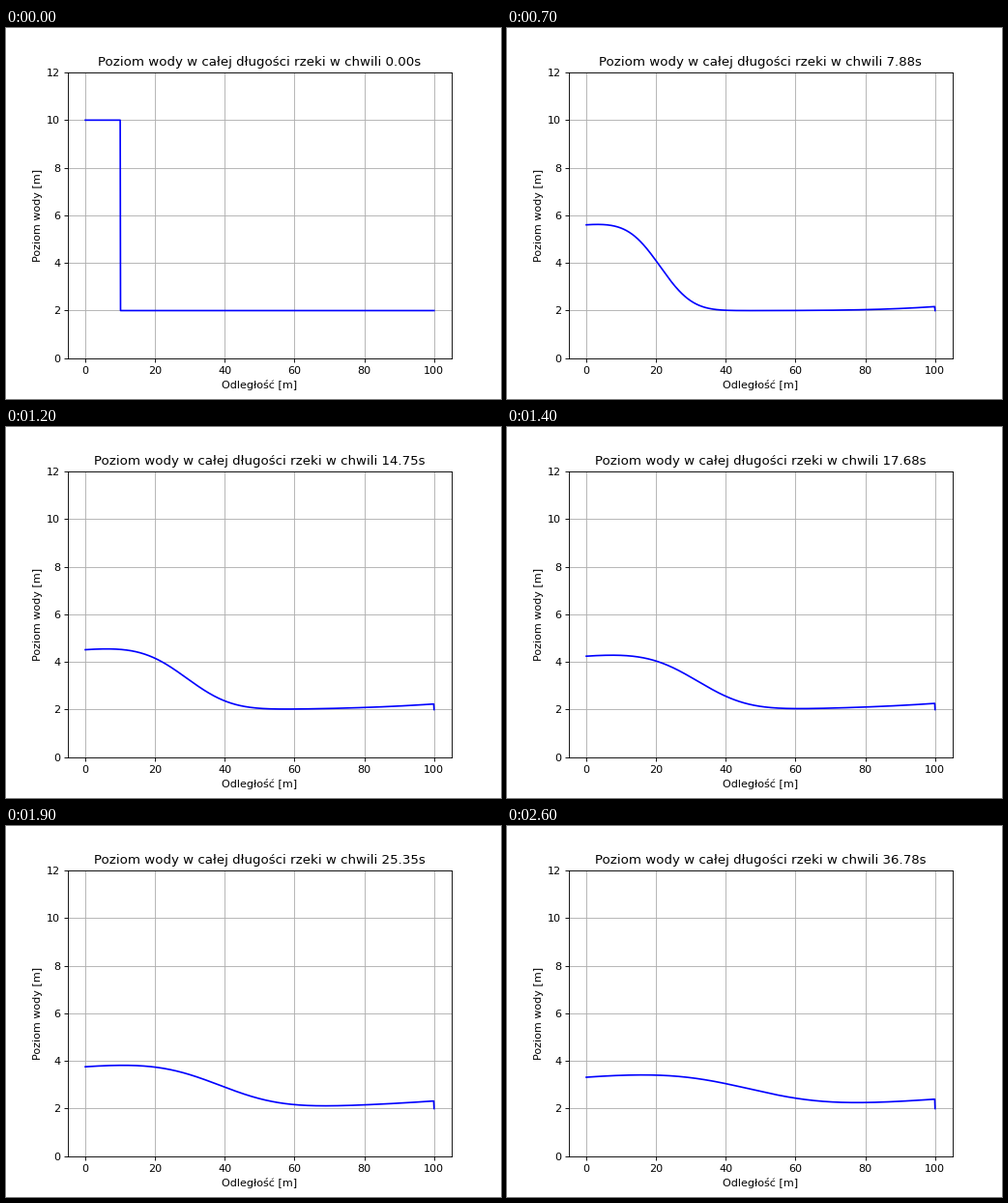
Animation, 512 px wide and 384 px high, one loop 2.7 s. Source, as a matplotlib script:

```python
import math

import numpy as np
import matplotlib.pyplot as plt
from matplotlib.animation import FuncAnimation

FRAMES = 27
LENGTH = 100.0   # river length [m]
DAM = 10.0       # initial dam position [m]
HIGH, LOW = 10.0, 2.0
SLOPE = 0.01     # bed slope

erf = np.vectorize(math.erf)
x = np.linspace(0, LENGTH, 1001)

# The time step grows as the wave slows down; a smooth curve through known moments.
knots = np.array([0, 3, 7, 12, 16, 22, 26])
moments = [0, 3.04, 7.88, 14.75, 20.69, 30.17, 36.78]
clock = np.polyfit(knots / 26, moments, len(knots) - 1)


def sim_time(i):
    return abs(np.polyval(clock, i / 26)) if i else 0.0


def wedge(d, t):
    """Water piling up against a wall, at distance d from it."""
    rise = 0.058 * math.sqrt(t) * (1 + 0.004 * t)
    z = d * SLOPE / (math.sqrt(math.pi) * rise)
    return rise * (np.exp(-z**2) - math.sqrt(math.pi) * z * (1 - erf(z)))


def water_level(t):
    if t == 0:
        return np.where(x <= DAM, HIGH, LOW)
    # Released water: a spreading block of constant volume.
    delay = 28 * t * math.exp(-(t / 2)**4)
    reach = math.sqrt(60 * t - 52 + 152 * math.exp(-t / 4.5) - delay)
    spread = math.sqrt(t * (12.5 + 0.1 * t))
    crest = (HIGH - LOW) * DAM / reach
    block = crest / 2 * (erf((x + reach) / spread) - erf((x - reach) / spread))
    h = LOW + block - wedge(x, t) + wedge(LENGTH - x, t)
    h[-1] = LOW  # fixed outlet
    return h


fig, ax = plt.subplots(figsize=(6.4, 4.8), dpi=80)
line, = ax.plot(x, water_level(0), "b")
ax.set_xlim(-5, 105)
ax.set_ylim(0, 12)
ax.set_xlabel("Odległość [m]")
ax.set_ylabel("Poziom wody [m]")
ax.grid(True)
title = ax.set_title("")


def update(i):
    t = sim_time(i)
    line.set_ydata(water_level(t))
    title.set_text(f"Poziom wody w całej długości rzeki w chwili {t:.2f}s")
    return line, title


anim = FuncAnimation(fig, update, frames=FRAMES, interval=100,
                     repeat=True, repeat_delay=0)
plt.show()
```
